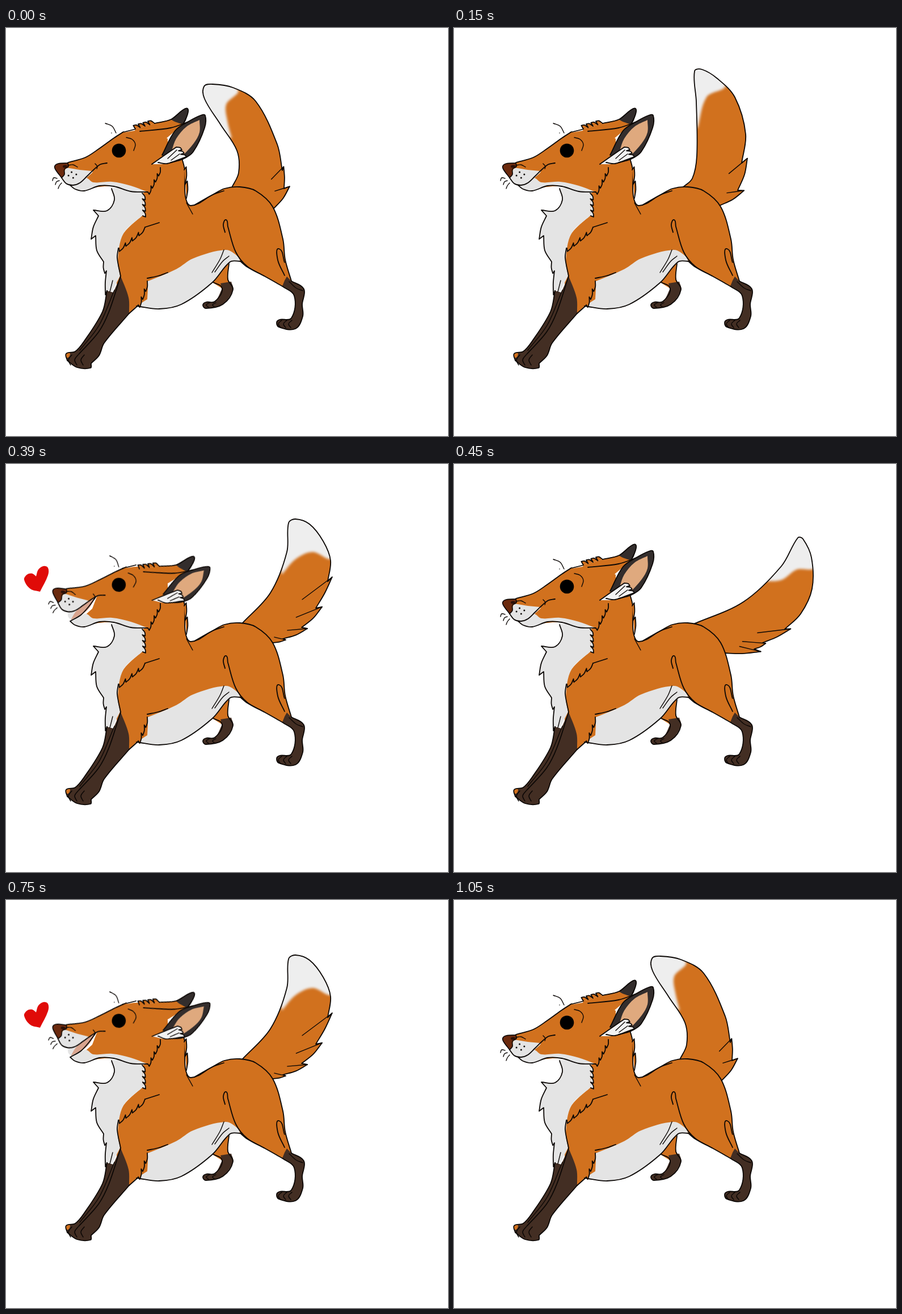
Recreate the animation shown at these times as an HTML page. Size 779 px wide and 719 px high, loop 1.2 s.

```html
<!DOCTYPE html>
<html lang="en">
<head>
<meta charset="utf-8">
<title>Happy fox</title>
<style>
html, body { margin: 0; width: 100%; height: 100%; overflow: hidden; background: #fff; }
svg { display: block; width: 100%; height: 100%; }
</style>
</head>
<body>
<svg id="stage" viewBox="0 0 779 719">
  <defs><filter id="soft"><feGaussianBlur stdDeviation="2"/></filter></defs>
</svg>
<script>
const ORANGE = '#d1711e', WHITE = '#e4e4e4', LEG = '#432e23', EAR = '#332d2c',
      SKIN = '#dfa97e', NOSE = '#6b2a0e', INK = '#0b0705';
const stage = document.getElementById('stage');

function add(parent, tag, attrs = {}) {
  const el = document.createElementNS('http://www.w3.org/2000/svg', tag);
  for (const k in attrs) el.setAttribute(k, attrs[k]);
  return parent.appendChild(el);
}
const group = parent => add(parent, 'g');

// "x,y" is a smooth point, "x,y!" a corner. "x,y~n:d" puts n tufts of depth d
// on the way to the next point; a negative n puts them on the other side.
function parse(text) {
  const raw = text.trim().split(/\s+/).map(s => {
    const [, x, y, sharp, n, d] = s.match(/^([\d.]+),([\d.]+)(!?)(?:~(-?\d+))?(?::(\d+))?$/);
    return { x: +x, y: +y, sharp: !!(sharp || n), n: +n || 0, d: +d || 0 };
  });
  const out = [];
  raw.forEach((a, i) => {
    out.push(a);
    if (!a.n) return;
    const b = raw[(i + 1) % raw.length], count = Math.abs(a.n);
    const dx = (b.x - a.x) / count, dy = (b.y - a.y) / count, step = Math.hypot(dx, dy);
    const out_ = Math.sign(a.n) * (a.d || step * 0.18) / step;
    const spot = (along, depth, more) => ({
      x: a.x + dx * along - dy * out_ * depth, y: a.y + dy * along + dx * out_ * depth, ...more
    });
    for (let k = 0; k < count; k++) {
      out.push(spot(k + 0.6, 0.9), spot(k + 1.2, 1, { sharp: true, tip: true }));
      if (k < count - 1) out.push(spot(k + 1, 0, { sharp: true }));
    }
    b.sharp = true;
  });
  return out;
}

function curve(text, closed) {
  const pts = parse(text), n = pts.length;
  const at = i => closed ? pts[(i + n) % n] : pts[i];
  const handle = (i, dir) => {
    const p = at(i), q = at(i + dir), back = at(i - dir);
    const from = p.sharp || !back ? p : back;
    const k = Math.hypot(q.x - p.x, q.y - p.y) / 3 / (Math.hypot(q.x - from.x, q.y - from.y) || 1);
    return `${p.x + (q.x - from.x) * k} ${p.y + (q.y - from.y) * k}`;
  };
  let d = `M${pts[0].x} ${pts[0].y}`;
  for (let i = 0; i < (closed ? n : n - 1); i++)
    d += `C${handle(i, 1)} ${handle(i + 1, -1)} ${at(i + 1).x} ${at(i + 1).y}`;
  return d;
}

const fill = (g, pts, color) => add(g, 'path', { d: curve(pts, true), fill: color });
const pen = (g, pts, width = 1.8, color = 'none') => add(g, 'path', {
  d: curve(pts), fill: color, stroke: INK, 'stroke-width': width,
  'stroke-linecap': 'round', 'stroke-linejoin': 'round'
});
const thin = (g, ...list) => list.forEach(pts => pen(g, pts, 1.4));

function toes(g, x, y, count, gap, h) {
  for (let i = 0; i < count; i++) {
    const cx = x + i * gap;
    pen(g, `${cx + 3},${y} ${cx - 3},${y + h / 2} ${cx + 1},${y + h}`, 1.5);
  }
}

// The edge runs from the lower root over the tip to the upper root.
function tail({ edge, tip }, i) {
  const g = group(stage), pts = parse(edge);
  fill(g, edge, ORANGE);
  const clip = add(g, 'clipPath', { id: 'tail' + i });
  add(clip, 'path', { d: curve(edge, true) });
  const inside = add(g, 'g', { 'clip-path': `url(#tail${i})` });
  fill(inside, tip, '#eeeeee').setAttribute('filter', 'url(#soft)');
  pen(g, edge);
  const a = pts[0], b = pts[pts.length - 1];
  const toRoot = (p, k) => `${p.x + ((a.x + b.x) / 2 - p.x) * k},${p.y + ((a.y + b.y) / 2 - p.y) * k}`;
  pts.filter(p => p.tip).forEach(p => thin(g, `${toRoot(p, 0)} ${toRoot(p, 0.4)}`));
  return g;
}

const tails = [{
  edge: '472,318~1 490,283~1:3 487,251 478,205 440,129 400,105 364,99 349,103 350,125 378,170 407,216 410,255 398,281!',
  tip: '408,108 388,135 390,163 398,195! 330,160! 330,80!'
}, {
  edge: '468,313~1 500,286~1 507,238 514,187 495,122 464,89 437,73 424,76 427,130 428,225 420,265 403,281!',
  tip: '478,99 445,122 429,178! 400,120! 420,50!'
}, {
  edge: '470,315~1 488,308~1 521,288~1 546,254~1:4 567,207 572,170 559,136 535,106 510,97 498,104 495,155 466,227 416,281!',
  tip: '576,165 540,155 510,168 486,195! 470,90! 590,90!'
}, {
  edge: '474,333~1:6 529,326~1:4 544,315~1:5 583,291! 611,264 631,220 630,165 615,132 606,130 577,180 510,243 420,283!',
  tip: '638,181 604,186 578,204 550,207! 580,110! 640,110!'
}].map(tail);

function drawBody(g) {
  const back = '309,226! 315,250 316,296 326,313 362,295 385,283 412,280 440,287 470,315 488,372 492,408 503,446!';
  const under = '413,411! 395,412 363,449 309,487 270,495 230,490!';
  const chest = `186,283! 191,303 178,322 154,321! 163,331~1:7 158,366 160,392 172,412~1:4
    177,428~1:3 178,463!`;
  const farLeg = '393,415 391,443 400,461 382,487 352,494 347,488 353,483 368,482 381,459 363,447';
  const shin = `503,446! 525,460 522,487 523,508 510,530 481,527 477,519 482,514 503,511 508,472 487,455!`;
  const frontLeg = `178,463! 170,500 137,553 122,570 106,574 108,586! 125,598 149,599 150,591!
    164,577 173,555 217,503!`;

  fill(g, '360,446! 393,410! 391,440 399,456! 381,459!', ORANGE);
  fill(g, '378,450! 397,447! 400,461 382,487 352,494 347,488 353,483 368,482 381,459!', LEG);
  pen(g, farLeg);
  toes(g, 356, 484, 2, 11, 8);

  fill(g, `${back} 490,456! 455,437 425,421 ${under} 217,503! 195,480! 195,437! 198,388
    207,362 240,330! 240,286! 275,230!`, ORANGE);
  fill(g, `248,447! 300,425 330,406 387,391 408,402 ${under} 249,478! 250,460!`, WHITE);
  fill(g, `${chest} 187,464! 201,437! 197,410 207,362 241,330! 240,292! 252,285! 215,278`, WHITE);
  fill(g, `${shin} 491,445! 495,438!`, LEG);
  fill(g, `${frontLeg} 216,475 202,437! 189,466!`, LEG);
  fill(g, '105,577 109,572 113,574 109,581', ORANGE);

  [back, under, chest, shin, frontLeg, '487,455 455,437 425,421 413,411',
    '198,388 196,405 202,437', '217,503 235,487'].forEach(pts => pen(g, pts));
  pen(g, '318,300~2:4 314,250', 1.8, ORANGE);
  pen(g, '240,291~-4:5 241,331', 1.8, WHITE);
  pen(g, '245,351~-4:5 199,388', 1.8, ORANGE);
  pen(g, '249,446~-3:4 233,488', 1.8, ORANGE);
  pen(g, '270,343 245,351');
  pen(g, '285,431 268,437 249,441');

  pen(g, '386,360 383,346 388,338 391,350 405,395 425,420 455,437');
  pen(g, '491,413 481,389 479,409 491,436');
  pen(g, '332,312 366,293 384,287');
  pen(g, '202,437 181,501 163,536 128,575');
  thin(g, '191,462 164,524 130,568', '384,391 377,408 363,431', '393,402 382,411 368,430',
    '499,447 511,458 523,463', '183,465 188,445', '318,308 329,328');
  toes(g, 483, 515, 3, 9, 13);
  toes(g, 113, 576, 3, 11, 18);
}

function drawHead(g) {
  fill(g, `207,184! 232,181 262,186 285,195! 285,238! 272,246! 250,289! 220,288 190,279
    147,281 125,279! 152,255! 160,234! 185,202!`, ORANGE);
  pen(g, '205,184 229,178');

  const crest = group(g);
  fill(crest, '226,183! 228,178! 262,168 291,161! 314,150! 314,168! 282,195! 240,195!', ORANGE);
  fill(crest, '290,161! 311,145 320,142 320,152 313,168 300,166', EAR);
  pen(crest, '262,168~4:7 228,178', 1.8, ORANGE);
  pen(crest, '262,168 291,161 311,145 320,142 320,152 313,168');
  pen(crest, '236,182 290,176 322,165');

  add(g, 'ellipse', { cx: 117, cy: 266, rx: 8, ry: 8, fill: WHITE });
  fill(g, '114,275! 125,258 159,233! 143,258', '#d8a48e');
  fill(g, '113,277! 140,264 154,272 187,271 220,278 250,289! 220,288 190,279 165,278 138,287 122,284', WHITE);
  pen(g, '250,289 220,288 190,279 165,278 138,287 122,284 113,277! 132,266 146,251 159,233');
  pen(g, '272,246~-4:4 250,289', 1.8, ORANGE);

  const snout = group(g);
  const top = '109,237 140,228 165,212 190,194 207,183!';
  const lip = '178,238! 165,241 143,261 130,273 118,277 106,274 98,264!';
  fill(snout, `${top} 225,210! ${lip} 100,243!`, ORANGE);
  fill(snout, '98,264! 106,246! 130,250 151,252! 143,261 130,273 118,277 106,274', WHITE);
  pen(snout, top);
  pen(snout, lip);
  pen(snout, '98,264! 87,249 86,243 92,239 109,238! 110,244 103,249 103,258 98,264!', 1.6, NOSE);
  add(snout, 'ellipse', { cx: 104, cy: 244, rx: 4, ry: 2.5, fill: '#2b1007' });
  add(snout, 'circle', { cx: 199, cy: 216, r: 12.3, fill: '#000' });
  for (let i = 0; i < 4; i++) {
    const turn = i * Math.PI / 2 - 0.2;
    add(snout, 'circle', { cx: 117 + 7 * Math.cos(turn), cy: 259 + 5 * Math.sin(turn), r: 1.5, fill: INK });
  }
  for (let i = 0; i < 3; i++) {
    const x = 82 + i * 5, y = 269 + i * 7;
    thin(snout, `${x},${y} ${x + 2},${y - 5} ${x + 8 - i},${y - 4 - i * 3}`);
  }
  thin(snout, '157,239 161,244 160,248', '212,193 222,196 228,205 225,216',
    '175,168 187,173 194,185', '109,242 118,241 126,245');
  add(snout, 'circle', { cx: 186, cy: 185, r: 0.8, fill: INK });

  const ear = group(g);
  const rim = '275,224! 298,181 323,164 343,154 351,154 350,176 330,218 312,231 290,237!';
  fill(ear, rim, EAR);
  fill(ear, '292,216! 300,195 318,174 341,162! 341,184 331,203 309,228!', SKIN);
  fill(ear, '257,240! 284,221 300,210~-3:6 312,229! 284,239', '#f2f2f2');
  pen(ear, rim);
  pen(ear, '257,240 284,221 300,210~-3:6 312,229! 284,239 268,237');
  thin(ear, '285,230 301,215', '291,233 306,222');
  return { crest, snout, ear };
}

drawBody(group(stage));
const { crest, snout, ear } = drawHead(group(stage));
const heart = fill(stage, '60,225! 43,220 32,204 37,195 46,193 53,198! 57,186 66,180 74,183 74,196', '#e00b08');

// The tail wags across and back in eight held beats.
const BEATS = 8;
function play(el, frame) {
  const steps = [];
  for (let i = 0; i <= BEATS; i++) {
    const beat = i % BEATS;
    steps.push({ offset: i / BEATS, easing: 'steps(1, end)', ...frame(Math.min(beat, BEATS - 1 - beat)) });
  }
  el.animate(steps, { duration: 1200, iterations: Infinity });
}
const show = (el, pose) => play(el, p => ({ opacity: p === pose ? 1 : 0 }));

const HAPPY = 2;
function tilt(el, origin, move) {
  el.style.transformOrigin = origin;
  play(el, p => ({ transform: p === HAPPY ? move : 'none' }));
}

tails.forEach(show);
show(heart, HAPPY);
tilt(snout, '200px 215px', 'translate(0px, -3px) rotate(9deg)');
tilt(crest, '236px 178px', 'translate(7px, 8px) rotate(9deg)');
tilt(ear, '257px 242px', 'rotate(13deg) scale(0.92)');
</script>
</body>
</html>
```
